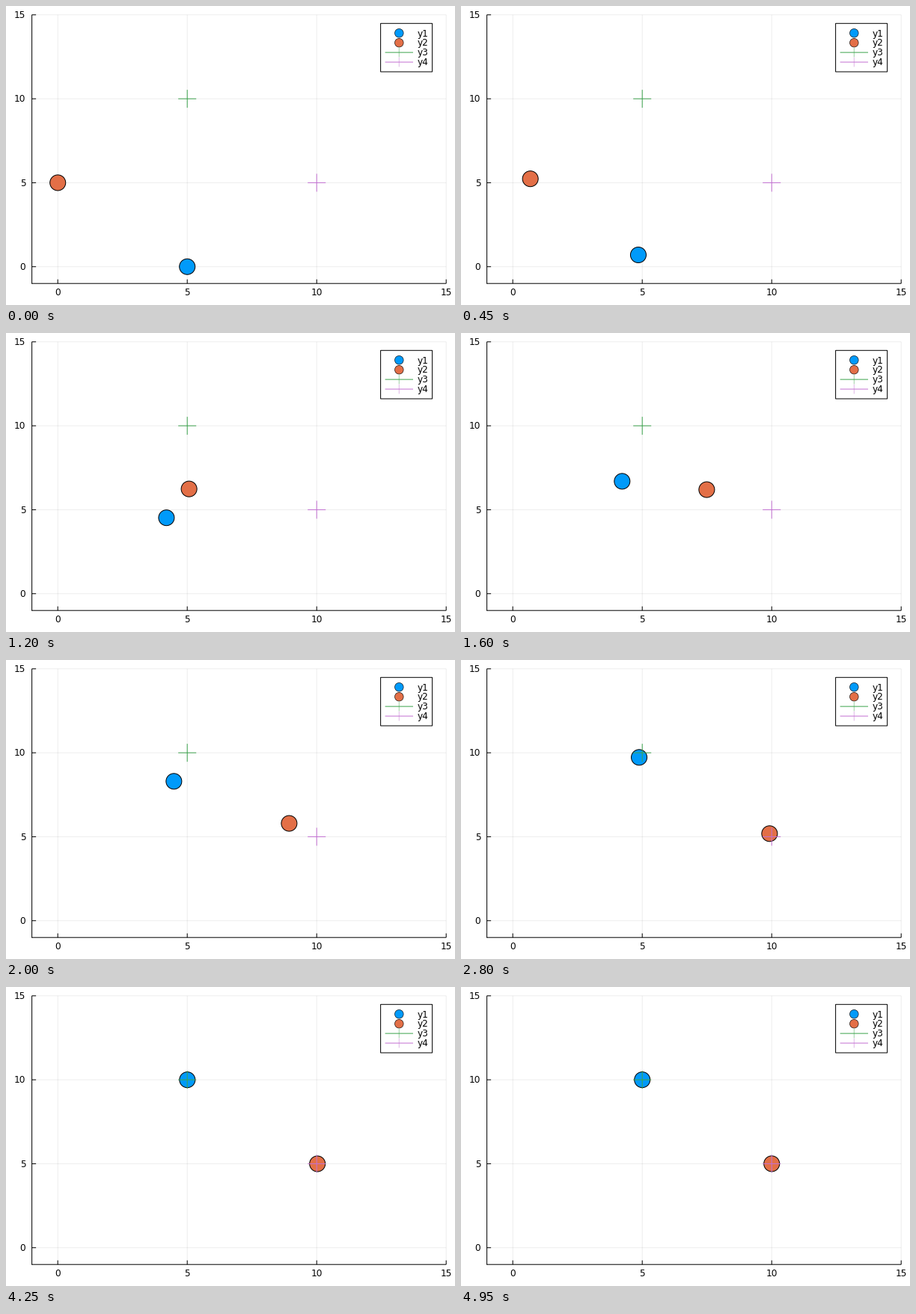
A matplotlib script that plays this animation: 600 by 400 pixels, repeating every 5 s.

```python
import numpy as np
import matplotlib.pyplot as plt
from matplotlib.animation import FuncAnimation
from matplotlib.patches import Circle, Rectangle

W, H, DPI = 600, 400, 100
FRAMES, INTERVAL = 100, 50
PX = 72 / DPI  # one pixel in points

BLUE, ORANGE, GREEN, PURPLE = "#009AFA", "#E36F47", "#3EA44E", "#C371D2"
LEFT, RIGHT, TOP, BOTTOM = 34.6, 588.2, 11.8, 371.2  # plot area
LOW, HIGH = -1, 15  # data limits on both axes

plt.rcParams["font.family"] = "DejaVu Sans"
fig = plt.figure(figsize=(W / DPI, H / DPI), dpi=DPI, facecolor="white")
ax = fig.add_axes([0, 0, 1, 1])
ax.set_xlim(0, W)
ax.set_ylim(H, 0)
ax.axis("off")


def px(u):
    return LEFT + (RIGHT - LEFT) * (u - LOW) / (HIGH - LOW)


def py(v):
    return BOTTOM + (TOP - BOTTOM) * (v - LOW) / (HIGH - LOW)


def line(x0, y0, x1, y1, color="black", z=1, alpha=1):
    ax.plot([x0, x1], [y0, y1], color=color, lw=PX, alpha=alpha,
            zorder=z, solid_capstyle="butt", snap=False)


def text(x, y, s, align):
    """Text whose digits are centred on height y."""
    ax.text(x, y + 4.3, s, size=8.7, ha=align, va="baseline", zorder=9)


def disc(x, y, r, color, width, z):
    return ax.add_patch(Circle((x, y), r, fc=color, ec="black",
                               lw=width * PX, zorder=z))


def cross(x, y, half, color, z):
    line(x - half, y, x + half, y, color, z)
    line(x, y - half, x, y + half, color, z)


def draw_axes():
    for t in range(0, HIGH + 1, 5):
        x, y = px(t), py(t)
        line(x, TOP, x, BOTTOM, alpha=0.07)
        line(LEFT, y, RIGHT, y, alpha=0.07)
        line(x, BOTTOM, x, BOTTOM - 5.5, z=2)
        line(LEFT, y, LEFT + 5.5, y, z=2)
        text(x, 382.7, str(t), "center")
        text(26.3, y, str(t), "right")
    line(LEFT, TOP, LEFT, BOTTOM + 0.5, z=2)
    line(LEFT, BOTTOM, RIGHT, BOTTOM, z=2)


def draw_legend():
    x, y, width, row = 500.6, 23.3, 69, 12.94
    ax.add_patch(Rectangle((x, y), width, 5 * row, fc="white", ec="black",
                           lw=PX, zorder=7, snap=False))
    for i, color in enumerate((BLUE, ORANGE, GREEN, PURPLE), start=1):
        mid, cy = x + 24.7, y + i * row
        if i <= 2:
            disc(mid, cy, 5.8, color, 0.6, 8)
        else:
            line(mid - 18.7, cy, mid + 18.7, cy, color, 8)
            line(mid, cy - 6.3, mid, cy + 6.3, color, 8, 0.5)
        text(x + 49, cy, f"y{i}", "left")


def spline(knots, values, at):
    """Cubic spline that starts and ends at rest."""
    t, p = np.array(knots, float), np.array(values, float)
    h, n = np.diff(t), len(t)
    d = np.diff(p) / h
    a, b = np.eye(n), np.zeros(n)
    for i in range(1, n - 1):
        a[i, i - 1:i + 2] = h[i], 2 * (h[i - 1] + h[i]), h[i - 1]
        b[i] = 3 * (h[i] * d[i - 1] + h[i - 1] * d[i])
    m = np.linalg.solve(a, b)
    j = np.clip(np.searchsorted(t, at, side="right") - 1, 0, n - 2)
    s, hj = (at - t[j]) / h[j], h[j]
    return ((1 + 2 * s) * (1 - s) ** 2 * p[j] + s * (1 - s) ** 2 * hj * m[j]
            + s * s * (3 - 2 * s) * p[j + 1] - s * s * (1 - s) * hj * m[j + 1])


# Both agents leave from rest after the first step and ease to their goals.
START = 0.5
steps = np.arange(FRAMES, dtype=float)
steps[:2] = START

# Orange hurries through the crossing; both swerve by the same amount there.
KEYS = [START, 16, 24, 34, 45, 60, 75, 99]
blue_progress = 1 - np.exp(-((steps - START) / 30) ** 2.08)
orange_progress = spline(KEYS, [0, 0.23, 0.507, 0.795, 0.942, 0.9985, 1.005, 1], steps)
swerve = spline(KEYS, [0, 15.6, 27.8, 25, 11.9, 2.7, 0.2, 0], steps)

blue_path = np.column_stack([px(5) - swerve, py(10 * blue_progress)])
orange_path = np.column_stack([px(10 * orange_progress), py(5) - swerve])

draw_axes()
draw_legend()
blue = disc(*blue_path[0], 10.5, BLUE, 1, 3)
orange = disc(*orange_path[0], 10.5, ORANGE, 1, 4)
cross(px(5), py(10), 12, GREEN, 5)
cross(px(10), py(5), 12, PURPLE, 6)


def update(k):
    blue.center = blue_path[k]
    orange.center = orange_path[k]
    return blue, orange


anim = FuncAnimation(fig, update, frames=FRAMES, interval=INTERVAL,
                     repeat=True, repeat_delay=0, blit=False)
plt.show()
```
